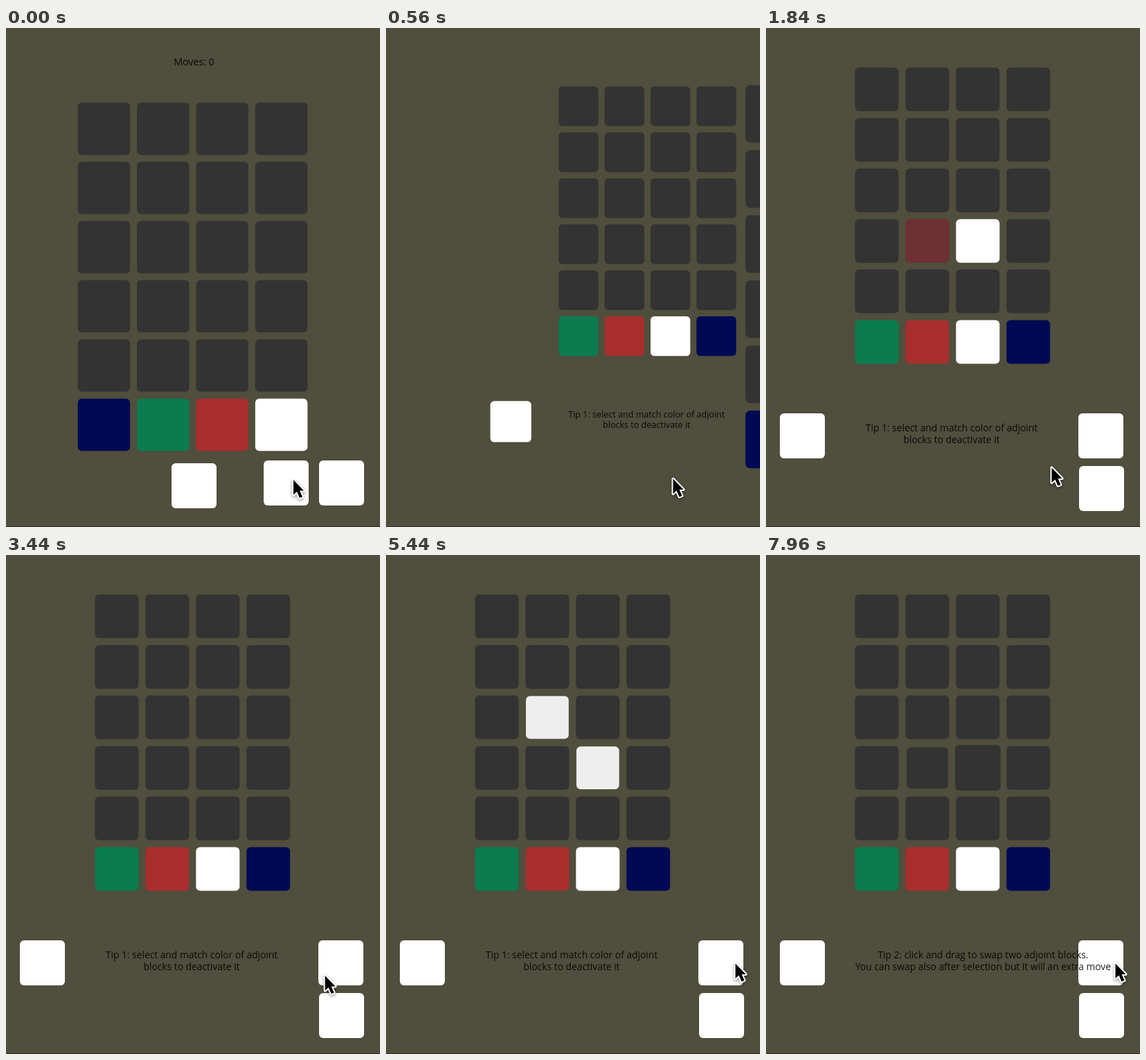
An HTML page with a canvas for the animation above (8000 ms loop, 540 px wide and 720 px high).

```html
<!DOCTYPE html>
<html lang="en">
<head>
<meta charset="utf-8">
<title>Block puzzle tutorial</title>
<style>
html, body { margin: 0; width: 100%; height: 100%; overflow: hidden; background: #504e3c; }
canvas { display: block; }
</style>
</head>
<body>
<canvas id="stage" width="540" height="720"></canvas>
<script>
const ctx = document.getElementById('stage').getContext('2d');
const LOOP = 8000;
const DARK = '#333333', BLUE = '#000a54', GREEN = '#0a7c50', RED = '#a92e2e', WHITE = '#ffffff';

const ramp = (t, a, b) => Math.min(1, Math.max(0, (t - a) / (b - a)));
const easeInOut = u => u < .5 ? 4 * u ** 3 : 1 - 4 * (1 - u) ** 3;
const mix = (a, b, u) => a + (b - a) * u;

// Square given by its centre
function square(x, y, size, color, alpha = 1, radius = 6) {
  ctx.globalAlpha = alpha;
  ctx.fillStyle = color;
  ctx.beginPath();
  ctx.roundRect(x - size / 2, y - size / 2, size, size, radius);
  ctx.fill();
  ctx.globalAlpha = 1;
}

function text(str, x, y, alpha = 1, size = 13.8) {
  ctx.globalAlpha = alpha * .88;
  ctx.fillStyle = '#000';
  ctx.font = `${size}px "Open Sans", "Noto Sans", sans-serif`;
  ctx.textAlign = 'center';
  ctx.fillText(str, x, y);
  ctx.globalAlpha = 1;
}

function scene(shift, scale, draw) {
  ctx.save();
  ctx.translate(270 + shift, 360);
  ctx.scale(scale, scale);
  ctx.translate(-270, -360);
  draw();
  ctx.restore();
}

function board(x, y, pitch, size, palette, scaleOf = () => 1) {
  for (let r = 0; r < 6; r++)
    for (let c = 0; c < 4; c++)
      square(x + c * pitch, y + r * pitch, size * scaleOf(c, r), r < 5 ? DARK : palette[c]);
}

function menu() {
  text('Moves: 0', 271.5, 54, 1, 14.2);
  board(141.4, 145.4, 85.4, 75.5, [BLUE, GREEN, RED, WHITE]);
  for (const [x, y] of [[271.5, 660.5], [404.5, 656.5], [484.5, 656.5]]) square(x, y, 65, WHITE);
}

const X = 160, Y = 88.5, PITCH = 72.9, SIZE = 63;
const place = (c, r) => [X + c * PITCH, Y + r * PITCH];

// A halo closes in on the tile while the tile lights up
function light(c, r, color, t, start, end) {
  const u = ramp(t, start, end);
  if (u <= 0) return;
  const [x, y] = place(c, r);
  if (u < 1) square(x, y, SIZE * mix(4, 1, u), WHITE, .29 * u, 9);
  square(x, y, SIZE, color, u);
}

function mismatch(t) {
  for (const [c, color, out] of [[1, RED, 1560], [2, WHITE, 2040]]) {
    if (t < 1360) light(c, 3, color, t, 560, 1360);
    else square(...place(c, 3), SIZE, color, 1 - ramp(t, out, out + 560));
  }
}

const pair = [[1, 2], [2, 3]];
const inPair = (c, r) => pair.some(p => p[0] === c && p[1] === r);

function match(t) {
  if (t >= 6480) return;
  const u = easeInOut(ramp(t, 5200, 6140));
  for (const [c, r] of pair) {
    if (t < 5200) light(c, r, WHITE, t, 4240, 5090);
    else {
      const v = Math.round(255 * (1 - u));
      square(...place(c, r), mix(SIZE, 45, u), `rgb(${v},${v},${v})`);
    }
  }
}

function tileScale(c, r, t) {
  if (inPair(c, r) && t > 5200 && t < 6480) return 0;
  if (r === 3 && t > 7480) {
    if (c === 1) return 1 + .33 * Math.sin(Math.PI * (t - 7480) / 459);
    if (c === 2) return 1 + .37 * Math.sin(Math.PI * (t - 7480) / 500);
  }
  return 1;
}

function tutorial(t) {
  board(X, Y, PITCH, SIZE, [GREEN, RED, WHITE, BLUE], (c, r) => tileScale(c, r, t));
  if (t < 2700) mismatch(t);
  else match(t);
  for (const [x, y] of [[52.5, 588.5], [483.5, 588.5], [484.5, 664.5]]) square(x, y, 65, WHITE);
  const first = 1 - ramp(t, 6620, 7020), second = ramp(t, 7040, 7440);
  text('Tip 1: select and match color of adjoint', 268, 582, first);
  text('blocks to deactivate it', 268, 599, first);
  text('Tip 2: click and drag to swap two adjoint blocks.', 313.5, 582, second);
  text('You can swap also after selection but it will an extra move', 313.5, 599, second);
}

const cursorPath = [
  [0, 415, 652], [560, 414.5, 650.5], [1560, 414.5, 650.5], [1840, 412.5, 634.5],
  [2600, 416, 630], [2920, 416, 630], [3440, 460.5, 607], [3740, 504.5, 589.5], [LOOP, 504.5, 589.5]
];
const arrow = [[0, 0], [0, 21.5], [5, 17], [9, 26], [13, 24.5], [9, 15.5], [15, 15.5]];

function cursor(t) {
  const i = cursorPath.findIndex(k => k[0] > t);
  const [a, ax, ay] = cursorPath[i - 1], [b, bx, by] = cursorPath[i];
  const u = ramp(t, a, b);
  ctx.save();
  ctx.translate(mix(ax, bx, u), mix(ay, by, u));
  ctx.beginPath();
  for (const p of arrow) ctx.lineTo(...p);
  ctx.closePath();
  ctx.shadowColor = 'rgba(0,0,0,.4)';
  ctx.shadowBlur = 4;
  ctx.shadowOffsetY = 2;
  ctx.strokeStyle = WHITE;
  ctx.lineWidth = 4;
  ctx.lineJoin = 'round';
  ctx.stroke();
  ctx.shadowColor = 'transparent';
  ctx.fillStyle = '#000';
  ctx.fill();
  ctx.restore();
}

function render(t) {
  ctx.fillStyle = '#504e3c';
  ctx.fillRect(0, 0, 540, 720);
  const p = easeInOut(ramp(t, 40, 865));
  if (p > 0) scene(540 * (1 - p), 1 - .45 * (1 - p), () => tutorial(t));
  if (p < 1) scene(540 * p, 1 + .125 * p, menu);
  ctx.fillStyle = '#3a2420';
  ctx.fillRect(0, 719, 540, 1);
  cursor(t);
}

const begin = performance.now();
function tick() {
  render(Math.max(0, performance.now() - begin) % LOOP);
  requestAnimationFrame(tick);
}
tick();
</script>
</body>
</html>
```
